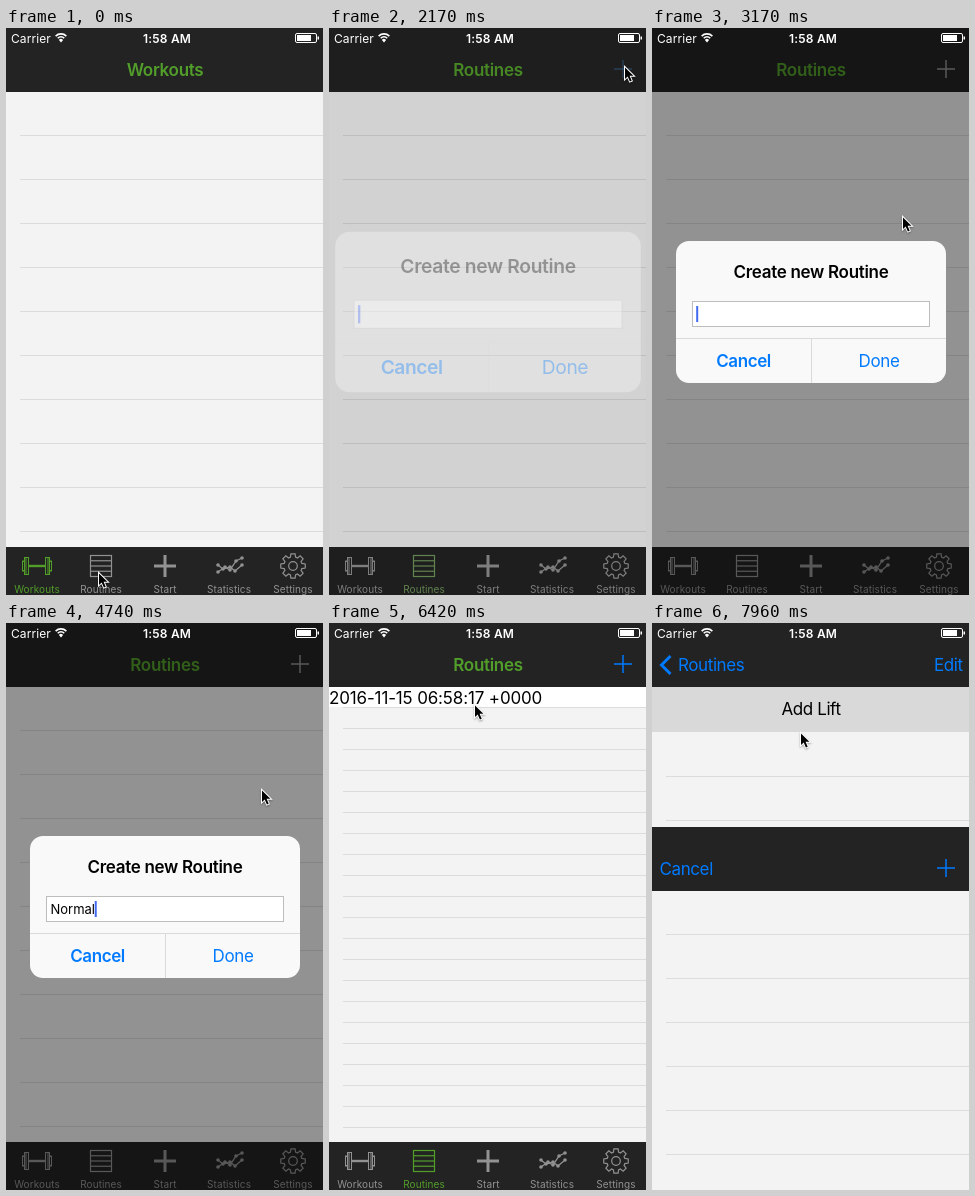
An HTML page with a canvas for the animation above (8000 ms loop, 317 px wide and 567 px high).

```html
<!DOCTYPE html>
<html lang="en">
<head>
<meta charset="utf-8">
<title>Workout tracker</title>
<style>
html, body { margin: 0; width: 100%; height: 100%; overflow: hidden; background: #232323; }
canvas { display: block; }
</style>
</head>
<body>
<canvas id="stage" width="317" height="567"></canvas>
<script>
const W = 317, H = 567, LOOP = 8000;
const ctx = document.getElementById('stage').getContext('2d');
const BAR = '#232323', PAPER = '#f3f3f3', RULE = '#dcdcdc', BLUE = '#007aff';
const GREEN_RGB = [82, 158, 42], BLUE_RGB = [0, 122, 255], GREY_RGB = [146, 146, 146];
const rgb = c => `rgb(${c.map(Math.round).join()})`;
const mix = (a, b, p) => rgb(a.map((v, i) => v + (b[i] - v) * p));
const GREEN = rgb(GREEN_RGB), GREY = rgb(GREY_RGB);
const clamp = v => Math.min(1, Math.max(0, v));

// Critically damped spring from 0 to 1.
function spring(t, start, speed) {
  const x = Math.max(0, t - start) / 1000 * speed;
  return 1 - (1 + x) * Math.exp(-x);
}
function easeInOut(t, start, end) {
  const x = clamp((t - start) / (end - start));
  return x < 0.5 ? 2 * x * x : 1 - 2 * (1 - x) ** 2;
}

function withAlpha(alpha, draw) {
  ctx.save();
  ctx.globalAlpha *= clamp(alpha);
  draw();
  ctx.restore();
}
function rect(x, y, w, h, color) {
  ctx.fillStyle = color;
  ctx.fillRect(x, y, w, h);
}
function text(str, x, y, { size = 17, weight = 400, color = '#000', align = 'left', track = -0.4 } = {}) {
  ctx.font = `${weight} ${size}px Inter, "Open Sans", sans-serif`;
  ctx.letterSpacing = track + 'px';
  ctx.textAlign = align;
  ctx.fillStyle = color;
  ctx.fillText(str, x, y);
}
function line(points, color, width, closed) {
  ctx.beginPath();
  points.forEach(([x, y]) => ctx.lineTo(x, y));
  if (closed) ctx.closePath();
  ctx.strokeStyle = color;
  ctx.lineWidth = width;
  ctx.stroke();
}
function circle(x, y, r) {
  ctx.beginPath();
  ctx.arc(x, y, r, 0, 7);
}

const title = (str, x, y, color) =>
  text(str, x, y, { weight: 600, color, align: 'center', track: -0.3 });

function rules(first, step, bottom) {
  for (let y = first; y < bottom; y += step) rect(14, Math.round(y), W - 14, 1, RULE);
}
function thinPlus(y, color) {
  rect(285, y - 0.75, 18, 1.5, color);
  rect(293.25, y - 9, 1.5, 18, color);
}

function statusBar() {
  text('Carrier', 5, 14.5, { size: 12, color: '#fff', track: 0.1 });
  text('1:58 AM', 161, 14.5, { size: 12, weight: 600, color: '#fff', align: 'center', track: 0.2 });
  ctx.strokeStyle = '#fff';
  ctx.lineWidth = 1.6;
  for (const r of [4.6, 7.6]) {
    ctx.beginPath();
    ctx.arc(55, 13.5, r, -Math.PI * 0.75, -Math.PI * 0.25);
    ctx.stroke();
  }
  ctx.fillStyle = '#fff';
  ctx.beginPath();
  ctx.moveTo(55, 14.5);
  ctx.arc(55, 13.5, 2.6, -Math.PI * 0.8, -Math.PI * 0.2);
  ctx.fill();
  ctx.lineWidth = 1;
  ctx.beginPath();
  ctx.roundRect(289.5, 5.5, 21, 9, 1.5);
  ctx.stroke();
  rect(291, 7, 14, 6, '#fff');
  rect(311.5, 8.5, 1.5, 3, '#fff');
}

const icons = {
  dumbbell(c) {
    rect(23, 536.8, 16, 2.4, c);
    for (const s of [-1, 1]) {
      ctx.strokeStyle = c;
      ctx.lineWidth = 1;
      const box = (near, far, half) =>
        ctx.strokeRect(31 + s * near, 538 - half, s * (far - near), half * 2);
      box(8.5, 12.5, 8.5);
      box(12.5, 14.5, 5);
      rect(31 + s * 11 - 0.5, 530, 1, 16, c);
    }
  },
  list(c) {
    ctx.strokeStyle = c;
    ctx.lineWidth = 1.2;
    ctx.strokeRect(84.5, 527.5, 21, 21);
    for (let i = 1; i < 4; i++) line([[84, 527.5 + i * 5.25], [106, 527.5 + i * 5.25]], c, 1.2);
  },
  plus(c) {
    rect(148, 536.5, 22, 3, c);
    rect(157.5, 527, 3, 22, c);
  },
  chart(c) {
    const series = [
      [[212, 544], [219, 539], [224, 542], [230, 533], [236, 530]],
      [[212, 537], [217, 541], [224, 539], [229, 543], [236, 537]]
    ];
    for (const s of series) {
      line(s, c, 1.3);
      ctx.fillStyle = c;
      for (const [x, y] of s) { circle(x, y, 1.8); ctx.fill(); }
    }
  },
  gear(c) {
    const outline = [];
    for (let i = 0; i < 8; i++) {
      for (const [turn, r] of [[-0.28, 9.2], [-0.17, 12.4], [0.17, 12.4], [0.28, 9.2]]) {
        const a = i * Math.PI / 4 + turn;
        outline.push([287 + r * Math.cos(a), 538 + r * Math.sin(a)]);
      }
    }
    line(outline, c, 1.2, true);
    circle(287, 538, 4.3);
    ctx.stroke();
  }
};
const tabs = [['Workouts', 'dumbbell'], ['Routines', 'list'], ['Start', 'plus'],
  ['Statistics', 'chart'], ['Settings', 'gear']];

function tabBar(active, tint) {
  rect(0, 519, W, 48, BAR);
  tabs.forEach(([label, icon], i) => {
    const c = i === active ? tint : GREY;
    icons[icon](c);
    text(label, 31 + i * 64, 564.5, { size: 10, color: c, align: 'center', track: 0.1 });
  });
}

function routineList(t) {
  rect(0, 64, W, 455, PAPER);
  if (t < 5560) return rules(107, 44, 519);
  rules(84, 21, 519);
  rect(0, 64, W, 20, t >= 6750 ? '#d9d9d9' : '#fff');
  text('2016-11-15 06:58:17 +0000', 0, 80.5, { track: -0.15 });
}
function liftList(t) {
  rect(0, 64, W, 455, PAPER);
  rules(108, 44.5, 519);
  const selected = t >= 7810;
  rect(0, 64, W, selected ? 45 : 44, selected ? '#d9d9d9' : '#fff');
  text('Add Lift', 159, 92, { align: 'center' });
}

function navBar(t, push, plusTint) {
  rect(0, 0, W, 64, BAR);
  if (t < 140) return title('Workouts', 159, 48, GREEN);
  withAlpha(1 - push * 1.4, () => title('Routines', 159 - 100 * push, 48, GREEN));
  const pressed = t >= 2080 && t < 2330;
  withAlpha((1 - push) * (pressed ? 0.4 : 1), () => thinPlus(41, plusTint));
  withAlpha(push, () => {
    line([[18.5, 33], [9.5, 42], [18.5, 51]], BLUE, 3);
    text('Routines', 26 + 98 * (1 - push), 48, { color: BLUE });
    text('Edit', 282, 48, { color: BLUE });
  });
}

const keys = [[3670, 'N'], [3850, 'o'], [3930, 'r'], [4080, 'm'], [4230, 'a'], [4320, 'l']];

function alertBox(t, show, fade) {
  const alpha = show * (1 - fade), scale = 1.2 - 0.2 * show;
  ctx.save();
  ctx.translate(159, 284);
  ctx.scale(scale, scale);
  ctx.translate(-159, -284);
  withAlpha(show * (1 - fade) ** 2, () => {
    ctx.fillStyle = '#f9f9f9';
    ctx.beginPath();
    ctx.roundRect(24, 213, 270, 142, 13);
    ctx.fill();
    rect(24, 310, 270, 1, '#dadada');
    rect(159, 310, 1, 45, '#dadada');
  });
  withAlpha(alpha, () => {
    rect(40, 273, 238, 26, fade ? 'rgba(255,255,255,.6)' : '#fff');
    ctx.strokeStyle = fade ? '#ddd' : '#bdbdbd';
    ctx.lineWidth = 1;
    ctx.strokeRect(40.5, 273.5, 237, 25);
    title('Create new Routine', 159, 249.5, '#000');
    text('Cancel', 91.5, 339, { weight: 600, color: BLUE, align: 'center', track: -0.4 });
    text('Done', 227, 339, { color: BLUE, align: 'center' });
    const typed = keys.filter(k => t >= k[0]).map(k => k[1]).join('');
    text(typed, 44.5, 290.5, { size: 13, track: 0 });
    const blinkedOff = t > 2620 && t < 3120;
    if (!blinkedOff && !fade) {
      rect(44.2 + ctx.measureText(typed).width, 278, 2, 16, '#426bf2');
    }
  });
  ctx.restore();
}

function modal(top) {
  rect(0, top, W, H, PAPER);
  rect(0, top, W, 64, BAR);
  text('Cancel', 7.5, top + 48, { color: BLUE });
  thinPlus(top + 41, BLUE);
  rules(top + 107, 44, H);
}

// Pointer stops: time, x, y.
const pointerPath = [
  [0, 92, 543], [290, 92, 543], [480, 121, 450], [670, 163, 325], [850, 195, 200],
  [1000, 235, 85], [1110, 261, 18], [1650, 261, 18], [1880, 295, 37], [2640, 295, 37],
  [2890, 225, 296], [3230, 255, 164], [4740, 255, 164], [5000, 238, 343], [5560, 238, 343],
  [5950, 195, 215], [6360, 142, 85], [6420, 145, 80], [7300, 145, 80], [7600, 148, 81],
  [7810, 148, 81], [7960, 148, 108], [8000, 148, 108]
];
function pointer(t) {
  const i = pointerPath.findIndex(p => p[0] > t);
  const [t0, x0, y0] = pointerPath[i - 1], [t1, x1, y1] = pointerPath[i];
  const p = (t - t0) / (t1 - t0);
  const arrow = [[1, 2.4], [1, 14], [3.7, 11.4], [5.9, 16.5], [7.7, 15.7], [5.6, 10.8], [9.4, 10.8]];
  ctx.save();
  ctx.translate(Math.round(x0 + (x1 - x0) * p), Math.round(y0 + (y1 - y0) * p));
  ctx.shadowColor = 'rgba(0,0,0,.35)';
  ctx.shadowBlur = 2;
  ctx.shadowOffsetY = 1;
  line(arrow, '#fff', 2, true);
  ctx.shadowColor = 'transparent';
  ctx.fillStyle = '#000';
  ctx.fill();
  ctx.restore();
}

function render(t) {
  const show = spring(t, 2100, 17);
  const fade = easeInOut(t, 5080, 5520);
  const dim = show * (1 - fade);
  const push = t < 7540 ? spring(t, 6790, 12) : 1;
  const tint = t < 5080 ? clamp(show * 1.4) : dim;

  rect(0, 0, W, H, PAPER);
  if (push < 1) {
    ctx.save();
    ctx.translate(Math.round(-95 * push), 0);
    routineList(t);
    ctx.restore();
    if (push > 0) rect(0, 64, W, 455, `rgba(0,0,0,${0.1 * push})`);
  }
  if (push > 0) {
    ctx.save();
    ctx.translate(Math.round(W * (1 - push)), 0);
    liftList(t);
    ctx.restore();
  }
  navBar(t, push, mix(BLUE_RGB, GREY_RGB, tint));
  tabBar(t < 140 ? 0 : 1, mix(GREEN_RGB, GREY_RGB, tint));

  if (dim > 0) {
    rect(0, 0, W, H, `rgba(0,0,0,${0.4 * dim})`);
    alertBox(t, show, fade);
  }
  if (t > 7840) modal(Math.round(H * (1 - spring(t, 7840, 18))));
  statusBar();
  pointer(t);
}

function tick(now) {
  render(now % LOOP);
  requestAnimationFrame(tick);
}
render(0);
requestAnimationFrame(tick);
</script>
</body>
</html>
```
